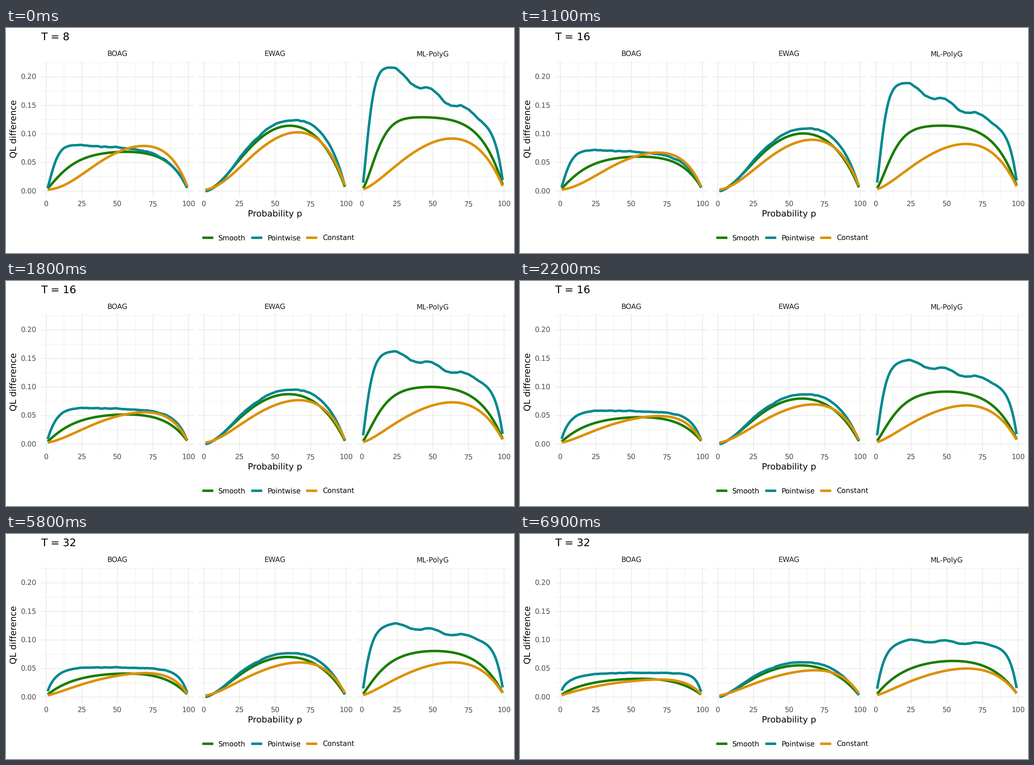
Animation, 1122 px wide and 499 px high, one loop 8 s. Source, as a matplotlib script:

```python
import matplotlib.pyplot as plt
import numpy as np
from matplotlib.animation import FuncAnimation
from matplotlib.lines import Line2D

W, H, DPI = 1122, 499, 100
PT = 72 / DPI
STEPS = 18                       # frames per transition
HORIZONS = (8, 16, 32)
COLORS = {"Smooth": "#1a7d00", "Pointwise": "#00888f", "Constant": "#dd9000"}
GRID = "#ebebeb"
TICK_GREY = "#4d4d4d"
SMALL, LARGE, TITLE = 15.6, 19.3, 23.2

plt.rcParams["font.family"] = "DejaVu Sans"
plt.rcParams["text.hinting"] = "none"

P = np.arange(1, 100)
U = P / 100

# Per curve: floor, then (height, rise width, rise power, fall power, tilt)
# at the first and the last horizon. Heights are in thousandths.
SHAPES = {
    "BOAG": {
        "Smooth": (2.5, (68.5, .18, 1.2, 7.5, 1), (33, .205, .95, 6, 1)),
        "Pointwise": (0, (84.5, .066, 1.4, 8, .82), (46, .07, .65, 25, .9)),
        "Constant": (2.5, (87, .42, 1.95, 8, 1), (35, .39, 1.05, 9, 1)),
    },
    "EWAG": {
        "Smooth": (.5, (131, .353, 1.8, 5.5, 1), (64, .318, 1.55, 5, 1)),
        "Pointwise": (-.5, (134, .338, 1.9, 7.5, 1), (69, .306, 1.52, 6, 1)),
        "Constant": (2.5, (119, .415, 1.85, 6.5, 1), (54, .414, 1.45, 7.5, 1)),
    },
    "ML-PolyG": {
        "Smooth": (3, (127, .132, 1.55, 6.7, 1), (66, .2, 1.05, 5.7, 1)),
        "Pointwise": (0, (255, .07, 1.45, 18, .45), (103, .06, 1.05, 19, .88)),
        "Constant": (3, (113, .406, 1.5, 5.5, 1), (60, .4, 1.3, 6, 1)),
    },
}
# Wave height and jitter of the pointwise curves.
ROUGHNESS = {"BOAG": (.5, .8), "EWAG": (.5, .6), "ML-PolyG": (6, 1.1)}


def bell(floor, height, width, rise, fall, tilt):
    """Saturating rise, then a drop to the floor at p = 100."""
    return floor + height * (1 - np.exp(-(U / width) ** rise)) * (1 - U ** fall) * tilt ** U


def series(floor, first, last, rough):
    """The curve at each horizon; shape values change geometrically."""
    middle = np.sqrt(np.multiply(first, last))
    return [(bell(floor, *shape) + rough * shape[0] / first[0]) / 1000
            for shape in (first, middle, last)]


def roughness(name, rng):
    wave, jitter = ROUGHNESS[name]
    noise = np.convolve(rng.normal(0, jitter, P.size), (.25, .5, .25), "same")
    return np.sin(np.pi * U) * (wave * np.cos(2 * np.pi * (P - 25) / 24) + noise)


fig = plt.figure(figsize=(W / DPI, H / DPI), dpi=DPI, facecolor="white")


def label(x, y, text, size, color="black", ha="center", **kw):
    return fig.text(x / W, 1 - y / H, text, fontsize=size * PT, color=color,
                    ha=ha, va="baseline", **kw)


LEFT, TOP, BOTTOM, WIDTH, STRIDE = 76.6, 72.5, 375.5, 338.8, 348.4
XLIM, YLIM = (-3.9, 103.9), (-0.0109, 0.2284)


def draw_grid(ax):
    for i in range(10):
        style = dict(color=GRID, lw=(0.9 if i % 2 else 1.8) * PT, snap=False, zorder=1)
        ax.axhline(0.025 * i, **style)
        if i < 9:
            ax.axvline(12.5 * i, **style)


rng = np.random.default_rng(4)
curves = []

for k, (name, shapes) in enumerate(SHAPES.items()):
    left = LEFT + k * STRIDE
    ax = fig.add_axes([left / W, 1 - BOTTOM / H, WIDTH / W, (BOTTOM - TOP) / H])
    ax.set(xlim=XLIM, ylim=YLIM)
    ax.axis("off")
    draw_grid(ax)
    for tick in range(0, 101, 25):
        x = left + (tick - XLIM[0]) / (XLIM[1] - XLIM[0]) * WIDTH
        label(x, 395.7, str(tick), SMALL, TICK_GREY)
    label(left + WIDTH / 2, 62.7, name, SMALL, "#1a1a1a")
    rough = roughness(name, rng)
    for kind, shape in shapes.items():
        line, = ax.plot([], [], color=COLORS[kind], lw=5.5 * PT, solid_capstyle="butt",
                        solid_joinstyle="round", zorder=3)
        curves.append((line, series(*shape, rough if kind == "Pointwise" else 0 * U)))

for i in range(5):
    y = BOTTOM - (0.05 * i - YLIM[0]) / (YLIM[1] - YLIM[0]) * (BOTTOM - TOP)
    label(67.8, y + 5.8, f"{0.05 * i:.2f}", SMALL, TICK_GREY, "right")

title = label(76.6, 27, "", TITLE, ha="left")
label(594.4, 417.8, "Probability p", LARGE)
label(23, 224, "QL difference", LARGE, rotation=90, rotation_mode="anchor")

for (kind, color), x in zip(COLORS.items(), (433.6, 541.6, 663)):
    fig.add_artist(Line2D([x / W, (x + 24.4) / W], [1 - 465.2 / H] * 2, color=color,
                          lw=5.5 * PT, solid_capstyle="butt", snap=False))
    label(x + 35.7, 471, kind, SMALL, ha="left")


def update(frame):
    first = np.clip(frame - 4, 0, STEPS) / STEPS
    second = np.clip(frame - 51, 0, STEPS) / STEPS
    for line, (a, b, c) in curves:
        line.set_data(P, a + (b - a) * first + (c - b) * second)
    title.set_text(f"T = {HORIZONS[int(first > 0) + int(second > 0)]}")
    return [line for line, _ in curves] + [title]


anim = FuncAnimation(fig, update, frames=80, interval=100, repeat=True, repeat_delay=0)
plt.show()
```
